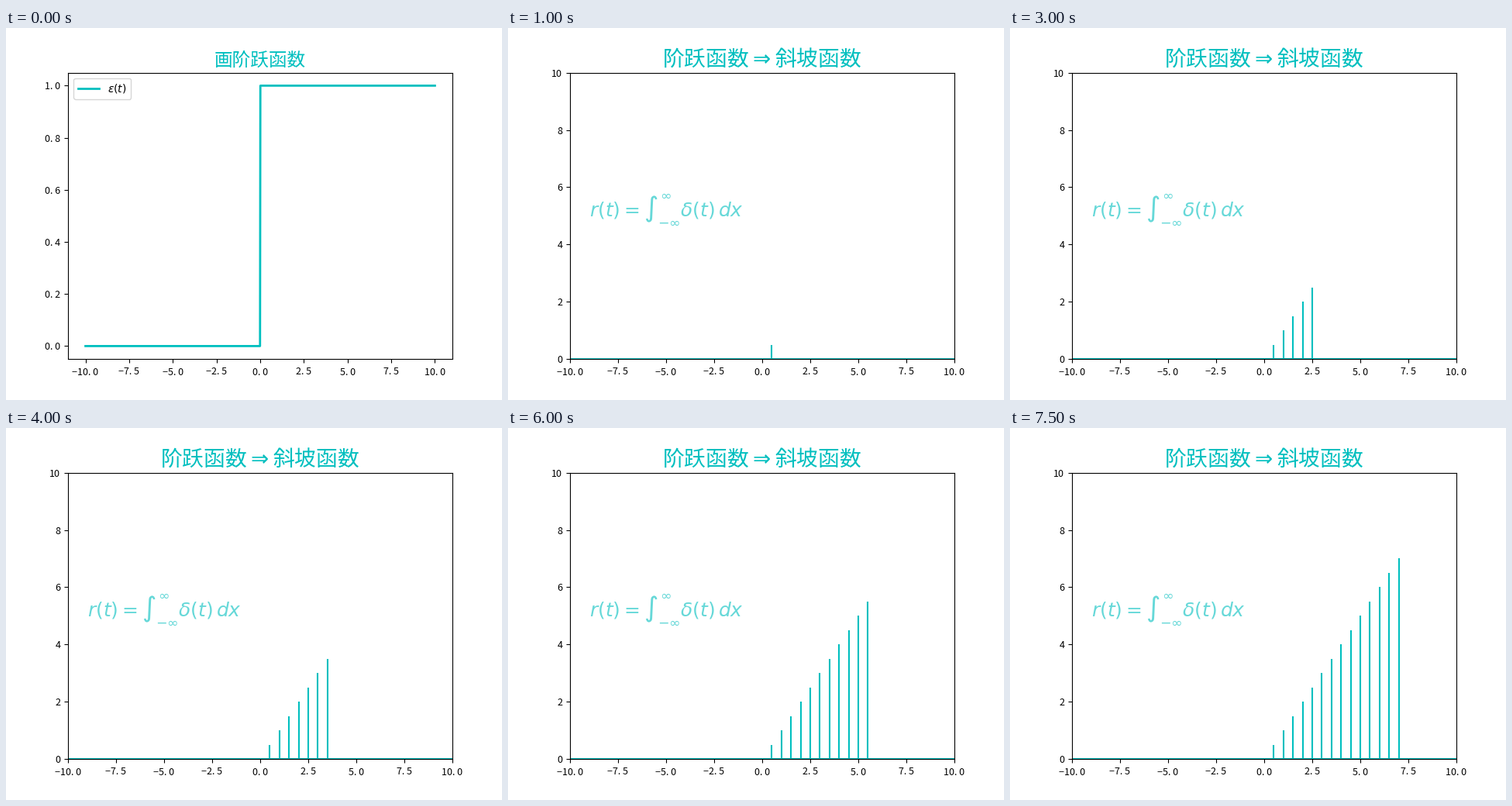
These frames come from a looping animation (640 by 480 pixels, 8 s). A matplotlib script:

```python
import numpy as np
import matplotlib.pyplot as plt
from matplotlib.animation import FuncAnimation

W, H = 640, 480
FRAMES, INTERVAL = 16, 500
COLOR = "c"
CJK = "Noto Sans CJK JP"

fig = plt.figure(figsize=(W / 100, H / 100), dpi=100)


def tick_text(value, digits):
    # a space after the point gives it a full digit cell
    return f"{value:.{digits}f}".replace("-", "\u2212").replace(".", ". ")


def make_axes(xlim, ylim, yticks, ydigits, title, size):
    ax = fig.add_axes([0.125, 0.11, 0.775, 0.77])
    ax.set(xlim=xlim, ylim=ylim, yticks=yticks,
           xticks=np.arange(-10, 10.1, 2.5))
    ax.tick_params(labelbottom=False, labelleft=False)
    ax.set_title(title, fontname=CJK, fontsize=size, color=COLOR)

    def label(x, y, s, ha):
        ax.text(x, H - y, s, transform=None, ha=ha, va="baseline",
                fontname=CJK, fontsize=9)

    for v in ax.get_xticks():
        px = ax.transData.transform((v, 0))[0]
        label(px, 448 if v % 5 == 0 else 447, tick_text(v, 1), "center")
    for v in yticks:
        py = H - ax.transData.transform((0, v))[1]
        label(70.3, py + 5, tick_text(v, ydigits), "right")
    return ax


step_ax = make_axes((-11, 11), (-0.05, 1.05), np.linspace(0, 1, 6), 1,
                    "画阶跃函数", 17)
step_ax.plot([-10, -0.01, 0.01, 10], [0, 0, 1, 1], color=COLOR, lw=2,
             label=r"$\varepsilon(t)$")
step_ax.legend(loc="upper left")

ramp_ax = make_axes((-10, 10), (0, 10), np.arange(0, 11, 2), 0,
                    r"阶跃函数$\Rightarrow$斜坡函数", 20)
base, = ramp_ax.plot([-10, 10], [0, 0], color=COLOR)
xs = np.arange(1, FRAMES - 1) * 0.5
bars = [ramp_ax.vlines(x, 0, x, color=COLOR, lw=1.5) for x in xs]

# stacked translucent copies make the formula look bold at first
formulas = [
    ramp_ax.text(-9, 5, r"$r(t)=\int_{-\infty}^{\infty}\delta(t)\,dx$",
                 fontsize=18, color=COLOR, alpha=0.6)
    for _ in range(5)
]


def update(k):
    step_ax.set_visible(k == 0)
    ramp_ax.set_visible(k > 0)
    for i, bar in enumerate(bars):
        bar.set_visible(i < k - 1)
    for copy in formulas[1:]:
        copy.set_visible(k == 1)
    base.set_linewidth({1: 3, 2: 2}.get(k, 1.5))
    return []


anim = FuncAnimation(fig, update, frames=FRAMES, interval=INTERVAL,
                     init_func=lambda: update(0), repeat=True,
                     repeat_delay=0, blit=False)
plt.show()
```
